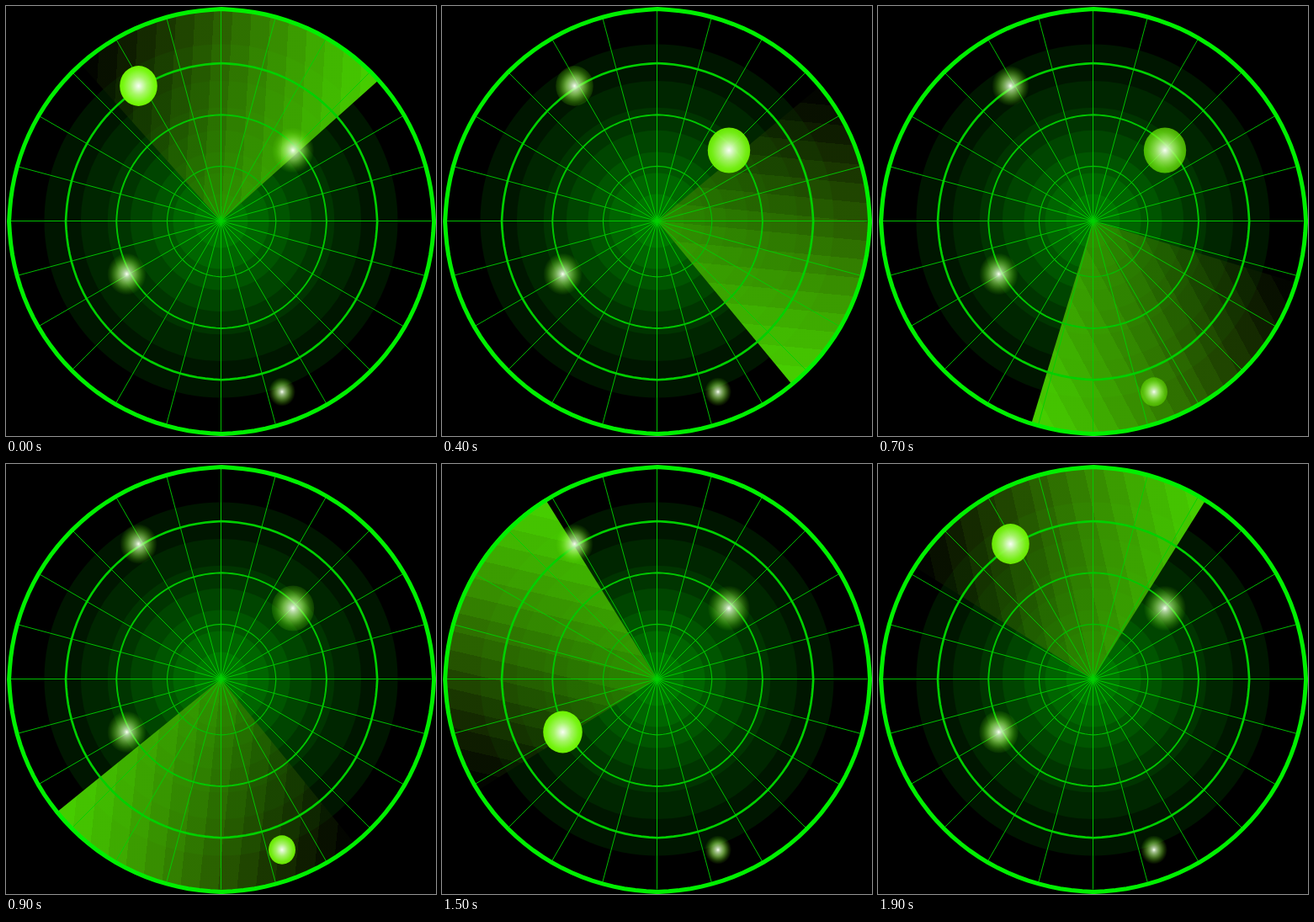
These frames come from a looping animation (511x511 px, 2000 ms). An HTML page with a canvas:

```html
<!DOCTYPE html>
<html lang="en">
<head>
<meta charset="utf-8">
<title>Radar</title>
<style>
html, body { margin: 0; width: 100%; height: 100%; overflow: hidden; background: #000; }
canvas { display: block; }
</style>
</head>
<body>
<canvas id="radar" width="511" height="511"></canvas>
<script>
const ctx = document.getElementById('radar').getContext('2d');
const C = 255.5, R = 252.5, LOOP = 2000, STEP = 100;
const RAD = Math.PI / 180, TURN = Math.PI * 2;
const SPREAD = 90, BEAM_BANDS = 16, DISC_COUNT = 8;

const BLIPS = [
  { x: 157.5, y: 95, r: 23, hit: 1500 },
  { x: 341, y: 171.5, r: 26, hit: 0 },
  { x: 143.5, y: 318.5, r: 24, hit: 960 },
  { x: 328, y: 458.5, r: 16.5, hit: 500 }
];

const rgba = (r, g, b, a) => `rgba(${r},${g},${b},${a})`;

function point(deg, r) {
  return [C + r * Math.sin(deg * RAD), C - r * Math.cos(deg * RAD)];
}

// Degrees clockwise from north; the turn starts fast and settles.
function heading(time) {
  const u = time / LOOP;
  const lead = 40 * (1 - u) * (1 - Math.exp(-Math.pow(u / .2, 1.3)));
  return 48.2 + 360 * u + lead;
}

// A blip is brightest about half a second after the beam touches it.
function echo(age) {
  return .3 + .7 * Math.exp(-Math.pow((age - 490) / 360, 2));
}

function drawDiscs() {
  for (let i = DISC_COUNT; i > 0; i--) {
    const r = 25 * i - 18 + 28 * Math.pow(i / DISC_COUNT, 8);
    ctx.fillStyle = rgba(0, 22 + 15.7 * (DISC_COUNT - i), 0, 1);
    ctx.beginPath();
    ctx.arc(C, C, r, 0, TURN);
    ctx.fill();
  }
}

// s runs from 0 at the leading tip to 1 at the tail.
function beamColor(s) {
  const red = 75 * (1 - Math.pow(s, 2.5));
  const green = 220 * (1 - Math.pow(s, 1.6));
  return rgba(red, green, 0, .95 * (1 - s / 2));
}

function drawBeam(deg) {
  const half = SPREAD / 2, side = deg - half + 90, reach = R * Math.sin(half * RAD);
  const fill = ctx.createLinearGradient(...point(side, reach), ...point(side, -reach));
  for (let i = 0; i < BEAM_BANDS; i++) {
    const color = beamColor((i + .5) / BEAM_BANDS);
    fill.addColorStop(i / BEAM_BANDS, color);
    fill.addColorStop((i + 1) / BEAM_BANDS, color);
  }
  ctx.fillStyle = fill;
  ctx.beginPath();
  ctx.moveTo(C, C);
  ctx.arc(C, C, R, (deg - SPREAD - 90) * RAD, (deg - 90) * RAD);
  ctx.fill();
}

function drawSpokes() {
  ctx.lineWidth = 1;
  ctx.strokeStyle = 'rgba(0,210,0,.9)';
  for (let deg = 0; deg < 360; deg += 15) {
    ctx.beginPath();
    ctx.moveTo(C, C);
    ctx.lineTo(...point(deg, 250));
    ctx.stroke();
  }
}

// Rings are slightly flattened between the axes.
function drawRing(rx, ry, width, green) {
  ctx.lineWidth = width;
  ctx.strokeStyle = rgba(0, green, 0, 1);
  ctx.beginPath();
  for (let deg = 0; deg < 360; deg += 3) {
    const a = deg * RAD;
    const dent = 1 - .006 * Math.sqrt(Math.abs(Math.sin(2 * a)));
    ctx.lineTo(C + .6 + rx * dent * Math.sin(a), C + .6 - ry * dent * Math.cos(a));
  }
  ctx.closePath();
  ctx.stroke();
}

function drawRings() {
  for (let i = 1; i < 4; i++) {
    const ry = 4.5 + 61.2 * i;
    drawRing(ry * .984, ry, .4 + .75 * i, 185 + 8 * i);
  }
  drawRing(R, R, 5, 240);
}

function drawBlip(b, time) {
  const level = echo((time - b.hit + LOOP) % LOOP);
  const edge = Math.max(0, (level - .42) / .58);
  const g = ctx.createRadialGradient(0, 0, 0, 0, 0, 1);
  g.addColorStop(0, 'rgba(248,255,242,1)');
  g.addColorStop(.15, rgba(220, 250, 200, .7 + .3 * level));
  g.addColorStop(.45, rgba(170, 250, 105, .34 + .64 * level));
  g.addColorStop(.8, rgba(122, 248, 22, .18 + .82 * edge));
  g.addColorStop(1, rgba(110, 245, 0, edge));
  ctx.save();
  ctx.translate(b.x, b.y);
  ctx.scale(b.r * .97, b.r * 1.04);
  ctx.fillStyle = g;
  ctx.beginPath();
  ctx.arc(0, 0, 1, 0, TURN);
  ctx.fill();
  ctx.restore();
}

function draw(time) {
  ctx.fillStyle = '#000';
  ctx.fillRect(0, 0, 511, 511);
  drawDiscs();
  drawBeam(heading(time));
  drawSpokes();
  drawRings();
  BLIPS.forEach(b => drawBlip(b, time));
}

const start = performance.now();
function tick() {
  const elapsed = (performance.now() - start) % LOOP;
  draw(Math.floor(elapsed / STEP) * STEP);
  requestAnimationFrame(tick);
}
tick();
</script>
</body>
</html>
```
